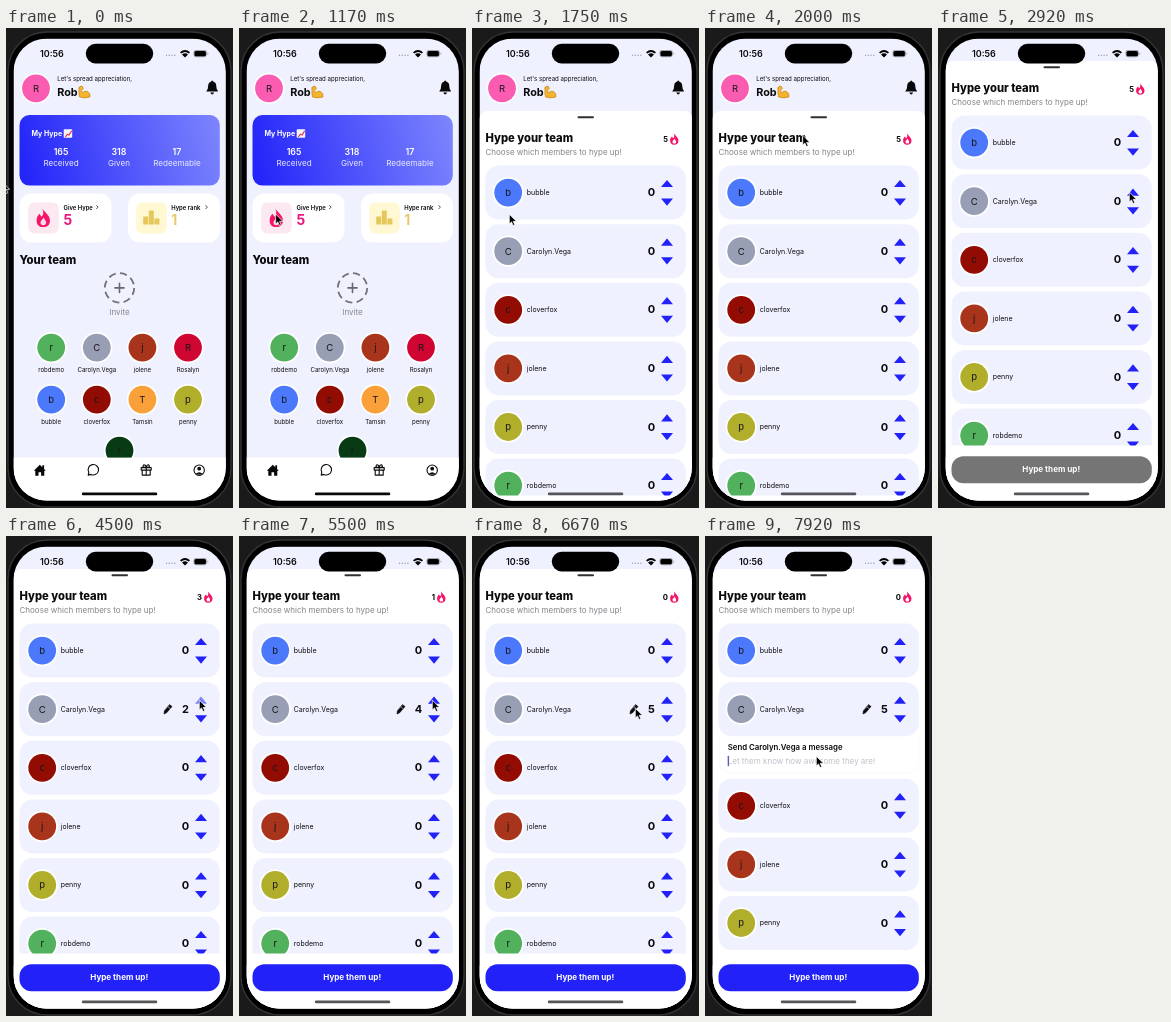
Animation, 227 px wide and 480 px high, one loop 8000 ms. Source, as an HTML page with a canvas:

```html
<!DOCTYPE html>
<html lang="en">
<head>
<meta charset="utf-8">
<title>Hype your team</title>
<style>
html, body { margin: 0; width: 100%; height: 100%; overflow: hidden; background: #1a1a1b; }
canvas { display: block; width: 227px; height: 480px; }
</style>
</head>
<body>
<canvas id="stage"></canvas>
<script>
const W = 227, H = 480, LOOP = 8000;
const canvas = document.getElementById('stage');
const ctx = canvas.getContext('2d');
const scale = window.devicePixelRatio || 1;
canvas.width = W * scale;
canvas.height = H * scale;

const INK = '#0b0b0e', LILAC = '#eff1fe', BLUE = '#2222f8', PINK = '#f5146a', GREY = '#85858b';
const TAPS = [3650, 4150, 4600, 5250, 5700];
const EDIT_AT = 7000;

const people = {
  robdemo: '#51b15c', 'Carolyn.Vega': '#989eb4', jolene: '#a8341c', Rosalyn: '#cf0632',
  bubble: '#4c78fb', cloverfox: '#920c04', Tamsin: '#f9a138', penny: '#b1ae2c'
};
const team = Object.keys(people);
const members = ['bubble', 'Carolyn.Vega', 'cloverfox', 'jolene', 'penny', 'robdemo'];
const CHOSEN = 1;

// Pointer keys: time, x, y
const pointerKeys = [
  [0, -4, 154], [150, -4, 154], [800, 36, 186], [1750, 37, 186], [2100, 112, 88],
  [2160, 112, 88], [2450, 112, 38], [2880, 191, 164], [4300, 193, 164], [5950, 193, 164],
  [6550, 163, 172], [7150, 163, 172], [7600, 111, 220], [8000, 111, 220]
];
const sheetKeys = [[0, 490], [1300, 490], [1680, 83], [2160, 83], [2450, 33], [8000, 33]];

const ease = p => p * p * (3 - 2 * p);

function track(keys, t, col = 1) {
  const i = Math.max(1, keys.findIndex(k => k[0] > t));
  const a = keys[i - 1], b = keys[i];
  return a[col] + (b[col] - a[col]) * ease((t - a[0]) / (b[0] - a[0]));
}

function text(s, x, y, size, { color = INK, weight = 400, align = 'left' } = {}) {
  ctx.font = `${weight} ${size}px Inter, "Open Sans", sans-serif`;
  ctx.textAlign = align;
  ctx.textBaseline = 'middle';
  ctx.fillStyle = color;
  ctx.fillText(s, x, y);
}

function box(x, y, w, h, r, color) {
  ctx.beginPath();
  ctx.roundRect(x, y, w, h, r);
  ctx.fillStyle = color;
  ctx.fill();
}

function disc(x, y, r, color) {
  ctx.beginPath();
  ctx.arc(x, y, r, 0, Math.PI * 2);
  ctx.fillStyle = color;
  ctx.fill();
}

function shape(d, x, y, fill, { stroke, width = 1, size = 1 } = {}) {
  ctx.save();
  ctx.translate(x, y);
  ctx.scale(size, size);
  const path = new Path2D(d);
  if (fill) { ctx.fillStyle = fill; ctx.fill(path); }
  if (stroke) {
    ctx.strokeStyle = stroke;
    ctx.lineWidth = width;
    ctx.lineJoin = ctx.lineCap = 'round';
    ctx.stroke(path);
  }
  ctx.restore();
}

function avatar(letter, x, y, color) {
  disc(x, y, 15.6, '#fff');
  disc(x, y, 13.9, color);
  text(letter, x, y + 0.5, 9.5, { align: 'center', color: '#17171c' });
}

function flame(x, y, size, hole) {
  shape('M-1-10C0-6 7-3 7 3C7 8 4 10 0 10C-5 10-7 7-7 3C-7 0-6-2-4-4L-2-1C1-3 0-6-1-10Z', x, y, PINK, { size });
  shape('M.5-.5C1 2 3 3 3 5.2C3 7 2 8 0 8C-2 8-3 7-3 5C-3 3-.5 2 .5-.5Z', x, y, hole, { size });
}

function phone() {
  ctx.fillStyle = '#1a1a1b';
  ctx.fillRect(0, 0, W, H);
  ctx.beginPath();
  ctx.roundRect(2, 4, 223, 475, 39);
  ctx.fillStyle = '#000';
  ctx.fill();
  ctx.strokeStyle = '#343436';
  ctx.lineWidth = 1.4;
  ctx.stroke();
}

function statusBar() {
  text('10:56', 33.5, 25.5, 9, { weight: 600 });
  box(79.3, 15.2, 67.4, 19.6, 9.8, '#000');
  for (let i = 0; i < 4; i++) disc(160 + i * 2.8, 26.7, 0.7, '#9a9ca8');
  shape('M-5-1.5Q0-6 5-1.5L3.8-.2Q0-3.5-3.8-.2ZM-3 .7Q0-2 3 .7L0 3.8Z', 178.5, 25.2, '#000');
  box(187, 21.4, 13.4, 7.2, 2.4, '#a5a6ad');
  box(188, 22.3, 11.4, 5.4, 1.6, '#000');
  box(200.9, 23.8, 0.9, 2.4, 0.5, '#a5a6ad');
}

function header() {
  avatar('R', 29.5, 59.7, '#fa5cb2');
  text("Let's spread appreciation,", 50.7, 50.7, 6.1);
  text('Rob', 50.7, 63.8, 10.8, { weight: 700 });
  shape('M-5.5-4Q-5-6-2.5-5.8L-1-3.5L-3-1.5L-2 1Q0-1.5 3-.5Q6 1 5.5 5Q0 7-5 5Q-6 1-5.5-4Z', 78, 63.3, '#f4b52e', { stroke: '#c8801b', width: 0.7 });
  shape('M-6 4Q-4 2-4-2Q-4-5-1-6Q0-8 1-6Q4-5 4-2Q4 2 6 4ZM-2 5H2Q1 7 0 7Q-1 7-2 5Z', 205.7, 59, '#08080a');
}

function summary() {
  const g = ctx.createLinearGradient(20, 150, 213, 100);
  g.addColorStop(0, '#2426f9');
  g.addColorStop(1, '#7c84fd');
  box(13, 86.5, 200.3, 70.5, 10, g);
  text('My Hype', 25, 105, 7, { color: '#fff', weight: 700 });
  box(57.2, 100.7, 8.5, 8.5, 0.8, '#f4f4fa');
  shape('M59 108L61 105.5L62.5 106.5L65 102.5', 0, 0, null, { stroke: '#e0354c', width: 1.1 });
  [['165', 'Received'], ['318', 'Given'], ['17', 'Redeemable']].forEach(([n, label], i) => {
    const x = 54.5 + i * 58;
    text(n, x, 123.3, 8.8, { color: '#fff', weight: 600, align: 'center' });
    text(label, x, 134.7, 8.1, { color: '#e9ebff', align: 'center' });
  });
}

function tiles() {
  for (const x of [13, 121.5]) box(x, 165, 92, 49, 12, '#fff');
  box(21.7, 174, 30.5, 31, 6, '#fbe8f0');
  flame(36.8, 189, 0.95, '#fbd9e6');
  box(129.7, 174, 30.5, 31, 6, '#fff8d2');
  [[136.7, 188, 8], [142.3, 182, 14], [147.9, 190, 6]].forEach(([x, y, h]) => box(x, y, 5, h, 0.5, '#e6c75c'));
  [['Give Hype', 57, '5', '#ec1682', 88], ['Hype rank', 164.7, '1', '#e9c76a', 197.3]].forEach(([label, x, n, color, arrow]) => {
    text(label, x, 179.3, 5.9, { weight: 600 });
    shape('M0-1.6L1.6 0L0 1.6', arrow + 2, 178.5, null, { stroke: INK, width: 0.7 });
    text(n, x, 192.3, 14, { color, weight: 700 });
  });
}

function roster() {
  text('Your team', 13, 232.4, 11.3, { weight: 800 });
  ctx.beginPath();
  ctx.arc(113, 259.3, 14.7, 0, Math.PI * 2);
  ctx.setLineDash([7.2, 4.35]);
  ctx.strokeStyle = '#727278';
  ctx.lineWidth = 1.8;
  ctx.stroke();
  ctx.setLineDash([]);
  shape('M-4.5 0H4.5M0-4.5V4.5', 113, 259.3, null, { stroke: '#66666c', width: 1.6 });
  text('Invite', 113, 283.5, 8, { color: GREY, align: 'center' });
  team.forEach((name, i) => {
    const x = 44.7 + (i % 4) * 45.6, y = 319 + Math.floor(i / 4) * 52;
    avatar(name[0], x, y, people[name]);
    text(name, x, y + 22.7, 6.1, { align: 'center' });
  });
  avatar('r', 113, 422, '#083a15');
}

function tabBar() {
  ctx.fillStyle = '#fff';
  ctx.fillRect(7, 429, 213, 44);
  const line = { stroke: INK, width: 1.1 };
  shape('M-6 .5L0-5.5L2.5-3V-5H4.3V-1.2L6 .5H4.5V5.5H1.3V2H-1.3V5.5H-4.5V.5Z', 33.3, 441.7, '#08080a');
  shape('M-5 5L-4.4 2.2A5.2 5.2 0 1 1-2.2 4.3Z', 86.7, 441.5, null, line);
  shape('M-5-2.5H5V0H-5ZM-4 0V5H4V0M0-2.5V5M0-2.5Q-5-3-2.5-5.3Q-.5-5.5 0-2.5Q.5-5.5 2.5-5.3Q5-3 0-2.5', 139.7, 441.5, null, line);
  shape('M5.2 0A5.2 5.2 0 1 1-5.2 0A5.2 5.2 0 1 1 5.2 0', 192.7, 441.6, null, line);
  disc(192.7, 440.1, 1.9, INK);
  shape('M-3.3 3.5Q0 .5 3.3 3.5Q0 5.3-3.3 3.5Z', 192.7, 441.6, INK);
}

function home() {
  ctx.fillStyle = LILAC;
  ctx.fillRect(7, 10, 213, 463);
  header();
  summary();
  tiles();
  roster();
  tabBar();
}

function messagePanel(open, t) {
  ctx.save();
  ctx.beginPath();
  ctx.rect(13, 200, 201, 38 * open);
  ctx.clip();
  ctx.globalAlpha = open;
  ctx.beginPath();
  ctx.roundRect(13.5, 190, 200, 46.5, 12);
  ctx.strokeStyle = '#f6f7fe';
  ctx.lineWidth = 1;
  ctx.stroke();
  text(`Send ${members[CHOSEN]} a message`, 22.2, 211.3, 7.8, { weight: 600 });
  text('Let them know how awesome they are!', 22.2, 224.8, 8, { color: '#bfc1c9' });
  if (t > 7250 && (t - 7250) % 1000 < 750) box(22.2, 219.2, 1.2, 10.5, 0.5, '#4a4ab8');
  ctx.restore();
}

function row(name, i, y, given, pressed) {
  const chosen = i === CHOSEN;
  box(13, y - 27, 200.3, 54, 13, LILAC);
  avatar(name[0], 35.7, y, people[name]);
  text(name, 54.2, y + 0.2, 7);
  if (chosen && given) {
    shape('M1.8-4.5L4-2.6L-1.4 3.6L-4 4.8L-3.6 1.8Z', 161.5, y, '#08080a', { stroke: '#08080a', width: 0.6 });
    shape('M.2-2.2L2.2-.5', 161.5, y, null, { stroke: LILAC, width: 0.6 });
  }
  text(chosen ? given : 0, 179, y + 0.3, 11, { weight: 700, align: 'center' });
  shape('M-6 3.5L0-3.7L6 3.5Z', 194.5, y - 9, chosen && pressed ? '#7c82fa' : BLUE);
  shape('M-6-3.5L0 3.7L6-3.5Z', 194.5, y + 9.5, BLUE);
}

function sheet(t) {
  const top = track(sheetKeys, t);
  if (top > H) return;
  const given = TAPS.filter(tap => t >= tap).length;
  const pressed = TAPS.some(tap => t >= tap - 140 && t < tap);
  const open = ease(Math.min(1, Math.max(0, (t - EDIT_AT) / 220)));

  ctx.save();
  ctx.translate(0, top - 33);
  box(7, 32.5, 213, 470, [8, 8, 0, 0], '#fff');
  box(105, 37.7, 16.5, 2, 1, '#303034');
  text('Hype your team', 13, 60, 11.2, { weight: 800 });
  text('Choose which members to hype up!', 13, 74, 8, { color: GREY });
  text(5 - given, 195.5, 61, 7.7, { weight: 700, align: 'right' });
  flame(201.8, 60.2, 0.6, '#fff');

  ctx.save();
  ctx.beginPath();
  ctx.rect(7, 84, 213, 333);
  ctx.clip();
  members.forEach((name, i) => {
    row(name, i, 114 + i * 58.6 + (i > CHOSEN ? 38 * open : 0), given, pressed);
  });
  if (open) messagePanel(open, t);
  ctx.restore();

  box(13, 427.7, 200.3, 27, 12, given ? BLUE : '#757575');
  text('Hype them up!', 112.7, 441.3, 8.1, { color: '#fff', weight: 700, align: 'center' });
  ctx.restore();
}

function pointer(t) {
  shape('M0 0V9.4L2.2 7.4L3.8 11L5.5 10.2L3.9 6.8H7Z', track(pointerKeys, t, 1), track(pointerKeys, t, 2),
    '#000', { stroke: '#fff', width: 0.7 });
}

function draw(now) {
  const t = now % LOOP;
  ctx.setTransform(scale, 0, 0, scale, 0, 0);
  phone();
  ctx.save();
  ctx.translate(0.5, 0.6);
  ctx.beginPath();
  ctx.roundRect(7, 10, 212.3, 462, 33);
  ctx.clip();
  home();
  sheet(t);
  statusBar();
  box(75.3, 463.9, 75.5, 2.8, 1.4, t < 1500 ? '#08080a' : '#55555a');
  ctx.restore();
  ctx.translate(0.3, 0.5);
  pointer(t);
}

const start = performance.now();
function loop() {
  draw(performance.now() - start);
  requestAnimationFrame(loop);
}
loop();
</script>
</body>
</html>
```
